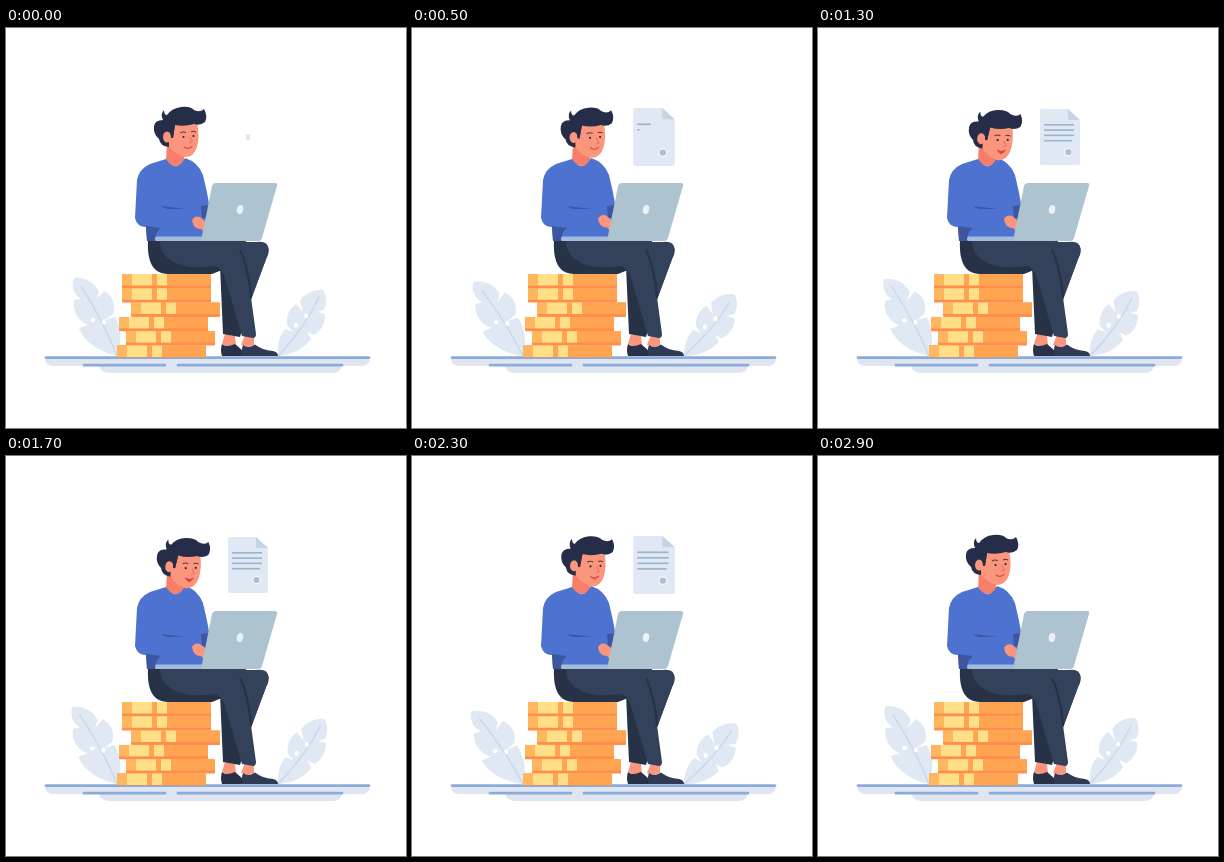
These frames come from a looping animation (400x400 px, 3000 ms). An HTML page:

```html
<!DOCTYPE html>
<html lang="en">
<head>
<meta charset="utf-8">
<title>Working on a stack of coins</title>
<style>
  html, body { margin: 0; width: 100%; height: 100%; overflow: hidden; background: #fff; }
  svg { display: block; width: 100%; height: 100%; }
</style>
</head>
<body>
<svg viewBox="0 0 400 400">
  <g id="leafL">
    <path fill="#e0e8f3" d="M111 328C94 324 78 314 73 300L82 297C72 293 66 283 68 272L75 271C67 266 65 257 68 250C78 249 89 254 93 264L90 272L98 263C107 268 110 277 107 286L99 292L109 289C116 300 116 314 111 328Z"/>
    <path fill="none" stroke="#cbd8ea" stroke-width="1.5" d="M111 328C102 304 89 280 75 258"/>
    <g fill="#fff"><ellipse cx="87" cy="292" rx="2.500" ry="2"/><ellipse cx="98" cy="294" rx="2" ry="2.500"/></g>
  </g>
  <g id="leafR">
    <path fill="#e0e8f3" d="M272 328C271 318 273 308 279 301L287 304L281 297C280 287 284 280 290 276L297 284L294 273C299 265 309 261 317 262C321 268 321 276 318 282L311 284L319 286C320 295 315 303 308 307L301 304L305 311C298 321 286 327 272 328Z"/>
    <path fill="none" stroke="#cbd8ea" stroke-width="1.5" d="M272 328C288 311 302 293 313 269"/>
    <g fill="#fff"><ellipse cx="300" cy="288" rx="2" ry="2.500"/><ellipse cx="290" cy="297" rx="2" ry="2.500"/></g>
  </g>

  <path fill="#dfe6f2" d="M39 331H364Q363 338 356 338H336Q334 345 327 345H103Q95 345 93 338H47Q40 338 39 331Z"/>
  <path fill="none" stroke="#8bacd8" stroke-width="2.8" stroke-linecap="round" d="M40 329.6H363M78 337.2H159M172 337.2H336"/>

  <g id="coins"></g>

  <g id="doc">
    <path fill="#e0e8f3" d="M224 81H250L262 92V134.500Q262 137 260 137H224Q222 137 222 135V83Q222 81 224 81Z"/>
    <path fill="#c5d3e6" d="M250 81L262 92H252Q250 92 250 90Z"/>
    <circle cx="250.500" cy="124" r="3.700" fill="#a9bfd6" stroke="#f6f9fc" stroke-width="1.200"/>
    <g id="rows" fill="#9ab3cf"></g>
  </g>

  <g fill="#fb967c">
    <path d="M219 306L229 308L230 317L224 319L216 316Z"/>
    <path d="M239 307L248 309L248 317L242 319L235 317Z"/>
  </g>
  <path fill="#293149" d="M216 316Q220 320 229 316Q235 321 239 325Q239 328 236 328H216Q214 322 216 316Z"/>
  <path fill="#313a55" d="M237 317Q243 321 249 316.500Q256 322 267 323Q272 324 272 328H237Q235 322 237 317Z"/>

  <path fill="#283246" d="M214 238L240 214L262 219Q264 224 260 231L245 272L234 309L217 306Z"/>
  <path fill="#34415a" d="M238 214H250Q262 212 262.500 221Q262 227 259 234L246 268Q244 242 234 224Z"/>
  <path fill="#283246" d="M142 213C141 232 146 246 162 246H206L216 242L240 213Z"/>
  <path fill="#34415a" d="M154 213H240L236 222Q242 238 244 262L250 306Q250 310 247 310L236 308L219 250Q215 238 208 238C180 243 154 234 154 213Z"/>
  <path fill="none" stroke="#283246" stroke-width="2" d="M234 222Q242 238 245 270"/>

  <path fill="#f77f69" d="M161 114L178 120V133Q170 143 160 133Z"/>
  <path fill="#4e72cf" d="M160 131Q170 146 179 130Q192 134 197 147Q201 163 204 181L199 213H141L140 199Q131 199 129 190L131 152Q133 141 144 136Z"/>
  <path fill="#3c579f" d="M149 165Q150 175 155 178L180 181L162 181Q150 179 149 165Z"/>
  <path fill="#3c579f" d="M140 198L155 200Q149 204 149 213H141ZM195 178L204 177L201 190H196Z"/>

  <g id="head">
    <path fill="#fb967c" d="M163 97L191 94Q194 109 191 119Q188 129 179 129Q169 127 163 118Z"/>
    <path fill="#262d49" d="M157 92Q154 86 158 82Q158 87 161 87Q166 80 175 79Q184 78 188 82Q194 85 198 81Q202 88 199 94Q194 98 188 96Q178 99 169 97Q168 103 167 110L163 107L163 119Q154 118 153 111Q147 106 148 98Q149 92 157 92Z"/>
    <ellipse cx="161" cy="109" rx="4" ry="5.500" fill="#fb967c"/>
    <path fill="#262d49" d="M164 97H169L167 110H165Z"/>
    <g fill="#2b2b41"><circle cx="177.500" cy="109" r="1.100"/><circle cx="187.500" cy="108" r="1.100"/></g>
    <path fill="none" stroke="#513749" d="M174 105Q177 103 180 104.500M185 104Q187 102.500 190 104"/>
    <path fill="none" stroke="#ed6f5d" d="M184 109L186.500 114L183.500 115"/>
    <path fill="none" stroke="#c94f4b" stroke-width="1.100" stroke-linecap="round" d="M178 119Q182 122 186 118.500"/>
    <path id="grin" fill="#e2413e" d="M178 119Q182 120 186 118.500Q184 123 181.500 122.500Q179 122 178 119Z"/>
  </g>

  <path id="hand" fill="#fb967c" d="M186 192Q189 187 194 189L200 194V206L195 201Q187 201 186 192Z"/>
  <path fill="#a2bcdc" d="M150 208.500H200V213H150Q148 211 150 208.500Z"/>
  <path fill="#adc4d0" d="M210 155H269Q272 155 271 158L256 210Q255 213 252 213H195L206 158Q207 155 210 155Z"/>
  <ellipse cx="234" cy="181.500" rx="3.200" ry="4.500" fill="#e9f1f6" transform="rotate(12 234 181.500)"/>
</svg>

<script>
const LOOP = 3000, STEP = 100;
const $ = id => document.getElementById(id);

function rect(parent, x, y, width, height, fill) {
  const r = document.createElementNS("http://www.w3.org/2000/svg", "rect");
  const attrs = { x, y, width, height };
  if (fill) attrs.fill = fill;
  for (const k in attrs) r.setAttribute(k, attrs[k]);
  parent.append(r);
  return r;
}

// Left edge of each coin row, from the top down
[116, 116, 125, 113, 120, 111].forEach((x, i) => {
  const g = $("coins"), y = 246 + i * 14.3, h = 11.4;
  rect(g, x, y, 89, i < 5 ? 14.3 : 12, "#ff8d4d").setAttribute("rx", 1);
  rect(g, x, y, 89, h, "#ffa552").setAttribute("rx", 1);
  rect(g, x, y, 10, h, "#ffb75f");
  rect(g, x + 10, y, 20, h, "#ffdf88");
  rect(g, x + 35, y, 10, h, "#ffdf88");
});

const rows = [30, 30, 30, 28].map((w, i) => ({
  el: rect($("rows"), 226, 96 + i * 5.3, 0, 1.6), w, start: 283 + i * 183
}));

const docScale = [[0, .1], [200, .8], [400, 1.07], [500, 1.04], [700, 1],
  [2200, 1], [2300, 1.04], [2400, 1.05], [2700, .1], [2800, 0], [3000, 0]];

function track(keys, t) {
  const i = keys.findIndex(k => k[0] > t);
  const [t0, a] = keys[i - 1], [t1, b] = keys[i];
  return a + (b - a) * (t - t0) / (t1 - t0);
}

const swing = (t, period) => (1 - Math.cos(t / period * 2 * Math.PI)) / 2;
const move = (id, transform) => $(id).setAttribute("transform", transform);

function draw(t) {
  const sway = swing(t, LOOP / 2), nod = swing(t, LOOP);
  move("leafL", `rotate(${-6.5 * sway} 112 328)`);
  move("leafR", `rotate(${7 * sway} 272 328)`);
  move("head", `translate(0 ${2.5 * nod}) rotate(${5 * nod} 170 135)`);
  move("hand", `translate(0 ${-1.5 * swing(t, 1000)})`);
  move("doc", `translate(242 109) scale(${track(docScale, t)}) translate(-242 -109)`);
  $("grin").setAttribute("opacity", Math.max(0, Math.min(1, nod * 2 - .5)));
  for (const r of rows) {
    r.el.setAttribute("width", Math.max(0, Math.min(r.w, (t - r.start) * .06)));
  }
}

function tick() {
  draw(Math.floor(performance.now() % LOOP / STEP) * STEP);
  requestAnimationFrame(tick);
}
tick();
</script>
</body>
</html>
```
